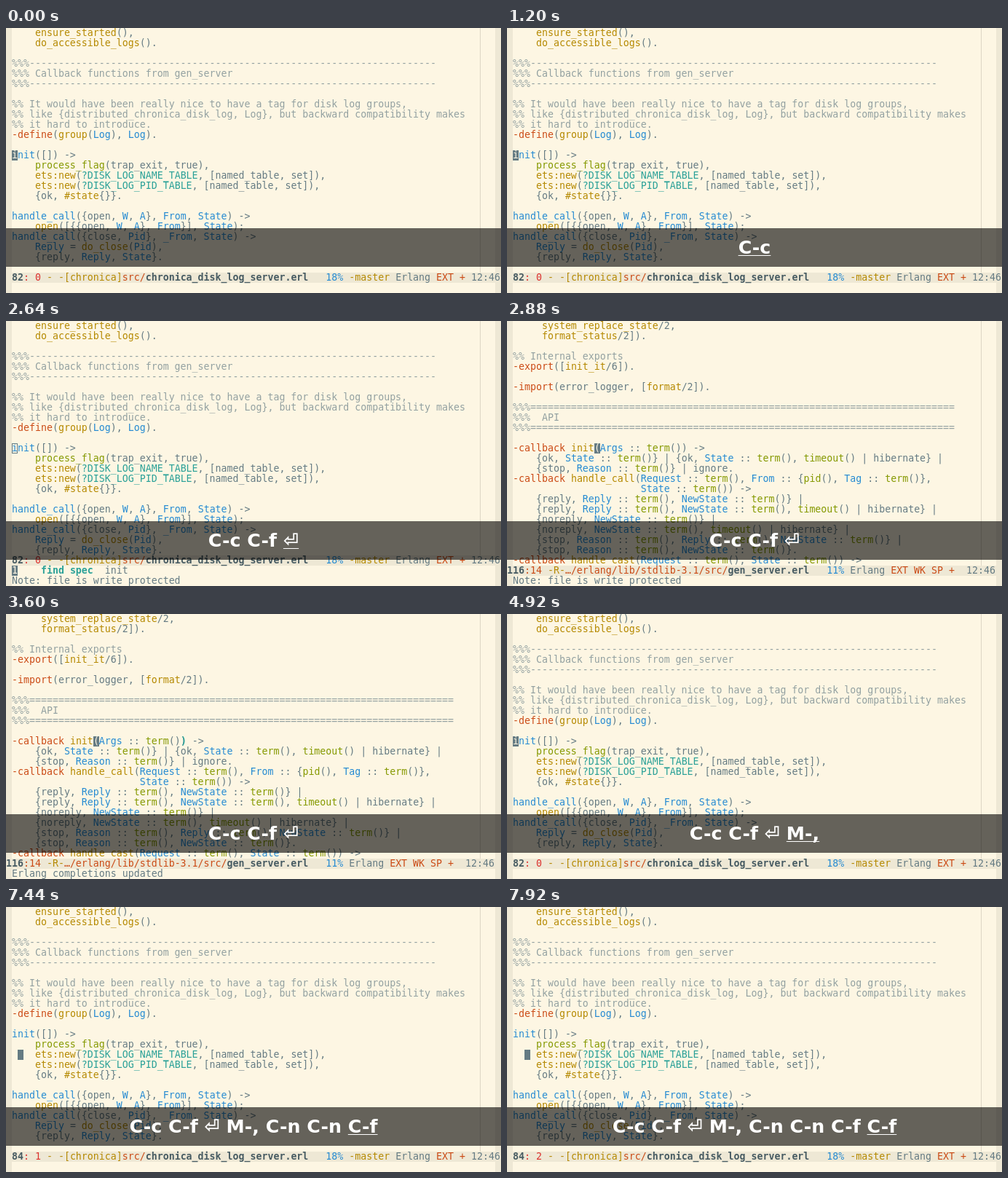
An HTML page for the animation above (8000 ms loop, 680x364 px).

```html
<!DOCTYPE html>
<html lang="en">
<head>
<meta charset="utf-8">
<title>Jumping to a callback spec</title>
<style>
html, body { margin: 0; width: 100%; height: 100%; overflow: hidden; }
#stage {
  position: relative; width: 680px; height: 364px; overflow: hidden;
  background: #fdf6e3; color: #657b83;
  font: 13.288px/14px "DejaVu Sans Mono", monospace; white-space: pre;
}
#stage > *, #screen > * { position: absolute; }
#screen { inset: 0; }
.fringe { top: 0; width: 8px; height: 364px; background: #eee8d5; }
.rule { left: 651px; top: 0; width: 1px; background: #ddd6c4; }
.row { left: 8px; height: 14px; }
.mode { left: 0; width: 680px; background: #eee8d5; }
.pick { width: 664px; overflow: hidden; background: #1a4b77; color: #fff; }
.pick i { font-style: normal; font-weight: bold; background: #5a2a6e; }
.cursor { width: 8px; height: 14px; background: #657b83; color: #fdf6e3; }
.hollow { background: none; box-shadow: inset 0 0 0 1px #657b83; }
.comment { color: #93a1a1; }
.attr { color: #cb4b16; }
.macro, .teal { color: #2aa198; }
.name { color: #268bd2; }
.bif { color: #859900; }
.call { color: #b58900; }
.red { color: #dc322f; }
.bold { color: #475b62; font-weight: bold; }
.hit { color: #2aa198; font-weight: bold; }
#keys {
  left: 0; top: 275px; width: 680px; height: 53px;
  background: rgba(0, 0, 0, .6); color: #fff; text-align: center;
  font: bold 25.33px/52px "DejaVu Sans", sans-serif;
}
#keys u { text-decoration-thickness: 1px; text-underline-offset: 2px; text-decoration-skip-ink: none; }
</style>
</head>
<body>
<div id="stage"><div id="screen"></div><div id="keys"></div></div>
<script>
const LOOP = 8000;
const KEYS = [[1200, 'C-c'], [1440, 'C-f'], [2640, '⏎'], [4920, 'M-,'],
  [6600, 'C-n'], [6720, 'C-n'], [7440, 'C-f'], [7920, 'C-f']];

const server = `    ensure_started(),
    do_accessible_logs().

%%%${'-'.repeat(70)}
%%% Callback functions from gen_server
%%%${'-'.repeat(70)}

%% It would have been really nice to have a tag for disk log groups,
%% like {distributed_chronica_disk_log, Log}, but backward compatibility makes
%% it hard to introduce.
-define(group(Log), Log).

init([]) ->
    process_flag(trap_exit, true),
    ets:new(?DISK_LOG_NAME_TABLE, [named_table, set]),
    ets:new(?DISK_LOG_PID_TABLE, [named_table, set]),
    {ok, #state{}}.

handle_call({open, W, A}, From, State) ->
    open([{{open, W, A}, From}], State);
handle_call({close, Pid}, _From, State) ->
    Reply = do_close(Pid),
    {reply, Reply, State}.`.split('\n');

const library = `     system_replace_state/2,
     format_status/2]).

%% Internal exports
-export([init_it/6]).

-import(error_logger, [format/2]).

%%%${'='.repeat(73)}
%%%  API
%%%${'='.repeat(73)}

-callback init(Args :: term()) ->
    {ok, State :: term()} | {ok, State :: term(), timeout() | hibernate} |
    {stop, Reason :: term()} | ignore.
-callback handle_call(Request :: term(), From :: {pid(), Tag :: term()},
                      State :: term()) ->
    {reply, Reply :: term(), NewState :: term()} |
    {reply, Reply :: term(), NewState :: term(), timeout() | hibernate} |
    {noreply, NewState :: term()} |
    {noreply, NewState :: term(), timeout() | hibernate} |
    {stop, Reason :: term(), Reply :: term(), NewState :: term()} |
    {stop, Reason :: term(), NewState :: term()}.
-callback handle_cast(Request :: term(), State :: term()) ->`.split('\n');

const span = (cls, text) => `<span class="${cls}">${text}</span>`;
const row = (y, html, cls = '') => `<div class="row ${cls}" style="top:${y * 14}px">${html}</div>`;
const cell = (y, x, char, cls) =>
  `<div class="${cls}" style="left:${8 + x * 8}px;top:${y * 14}px">${char}</div>`;
const cursor = (y, x, char = '') => cell(y, x, char, 'cursor');

const CLASSES = ['comment', 'attr', 'macro', 'name', 'bif', 'call'];
const TOKEN = /(^%%.*)|(^-\w+)|(\?\w+)|(^[a-z]\w*(?=\()|\b_?[A-Z]\w*)|(process_flag|\b(?:term|pid|timeout)(?=\())|(#state|[a-z][\w:]*(?=\(|\/\d))/g;
const paint = line => line.replace(TOKEN, (m, ...g) => span(CLASSES[g.findIndex(Boolean)], m));
const code = lines => lines.map((line, y) => row(y, paint(line))).join('');

const serverMode = (line, col) => ' ' + span('bold', line) + span('red', ': ' + col) +
  span('call', ' - -[chronica]') + span('attr', 'src/') +
  span('bold', 'chronica_disk_log_server.erl') + span('name', '   18%') +
  span('call', ' -master') + ' Erlang' + span('attr', ' EXT +') + ' 12:46';
const libraryMode = span('bold', '116') + span('attr', ':14') + span('call', ' -R-') +
  span('attr', '…/erlang/lib/stdlib-3.1/src/') + span('bold', 'gen_server.erl') +
  span('name', '   11%') + ' Erlang' + span('attr', ' EXT WK SP +') + '  12:46';
const note = row(25, 'Note: file is write protected');
const match = '<b>/usr/lib/erlang/lib/stdlib-3.1/src/gen_server.erl</b>:116:-callback ' +
  '<i>ini</i>t(Args :: <i>t</i>erm()';

function screen(t) {
  const prompt = t >= 1560 && t < 2880;
  const frame = '<div class="fringe"></div><div class="fringe" style="left:672px"></div>' +
    `<div class="rule" style="height:${prompt ? 322 : 336}px"></div>`;
  if (t >= 2880 && t < 4920) {
    return frame + code(library) + cursor(12, 14, '(') +
      (t < 3000 ? '' : cell(12, 29, ')', 'hit')) + row(24, libraryMode, 'mode') +
      (t < 3600 ? note : row(25, 'Erlang completions updated'));
  }
  const base = frame + code(server);
  if (prompt) {
    return base + cell(12, 0, '', 'cursor hollow') + row(23, serverMode(82, 0), 'mode') +
      row(24, span('teal', '1') + '    ' + span('hit', 'find spec') + '  init') +
      (t >= 2640 ? cursor(24, 0, '1') + note
        : cursor(24, 20) + row(25, match, 'pick') + cell(25, 83, '→', ''));
  }
  const down = (t >= 6600) + (t >= 6720), right = (t >= 7440) + (t >= 7920);
  return base + cursor(12 + down, right, server[12 + down][right]) +
    row(24, serverMode(82 + down, right), 'mode');
}

function keys(t) {
  const shown = KEYS.filter(k => k[0] <= t);
  return shown.map(([start, key], i) =>
    i === shown.length - 1 && t < start + 240 ? `<u>${key}</u>` : key).join(' ');
}

const drawn = {};
function put(id, html) {
  if (drawn[id] !== html) document.getElementById(id).innerHTML = drawn[id] = html;
}
let begin;
function tick(now) {
  begin ??= now;
  const t = (now - begin) % LOOP;
  put('screen', screen(t));
  put('keys', keys(t));
  requestAnimationFrame(tick);
}
requestAnimationFrame(tick);
</script>
</body>
</html>
```
